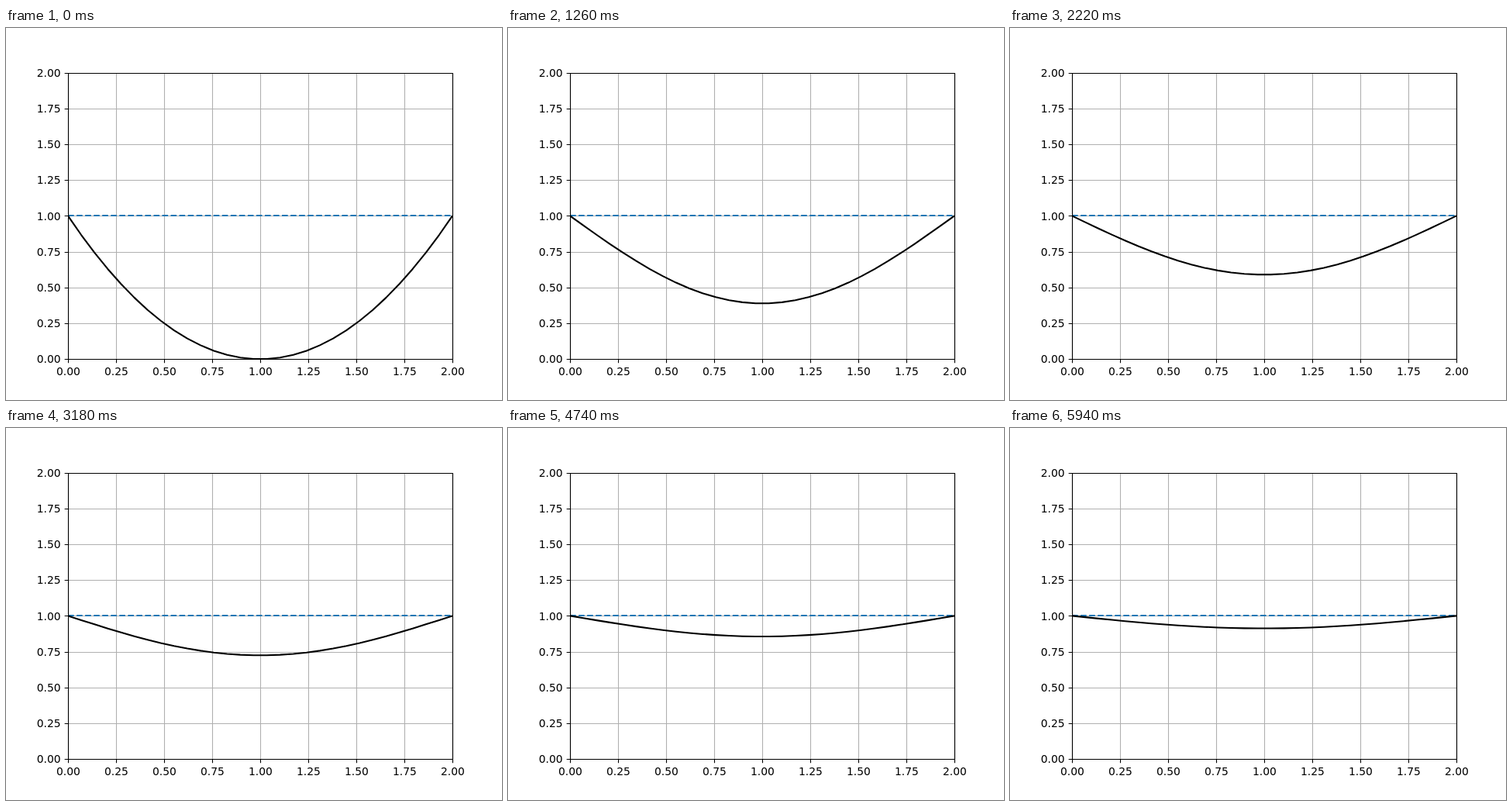
Write an HTML page that moves like this. It is 640 by 480 pixels and loops after 6 s.

```html
<!DOCTYPE html>
<html lang="en">
<head>
<meta charset="utf-8">
<title>Heat equation</title>
<style>
  html, body { margin: 0; width: 100%; height: 100%; overflow: hidden; background: #fff; }
  svg { display: block; width: 640px; height: 480px; }
  text { font: 13.889px "DejaVu Sans", sans-serif; }
</style>
</head>
<body>
<svg id="plot" viewBox="0 0 640 480">
  <clipPath id="area"><rect x="80" y="57.6" width="496" height="369.6"/></clipPath>
</svg>
<script>
const STEP = 60, STEPS = 100, POINTS = 30;
const plot = document.getElementById('plot');
const px = x => 80 + 248 * x;
const py = y => 427.2 - 184.8 * y;
const snap = v => Math.floor(v + 0.5) + 0.5;

function add(tag, attrs, text = '') {
  const el = document.createElementNS('http://www.w3.org/2000/svg', tag);
  for (const key in attrs) el.setAttribute(key, attrs[key]);
  el.textContent = text;
  return plot.appendChild(el);
}

function stroke(d, color, width, extra) {
  return add('path', { d, fill: 'none', stroke: color, 'stroke-width': width, ...extra });
}

const ticks = Array.from({ length: 9 }, (_, i) => i / 4);
const left = snap(px(0)), right = snap(px(2));
const top_ = snap(py(2)), bottom = snap(py(0));

// Grid, ticks and labels
for (const v of ticks) {
  const x = snap(px(v)), y = snap(py(v)), label = v.toFixed(2);
  stroke(`M${x} ${bottom}V${top_}M${left} ${y}H${right}`, '#b0b0b0', 1.11);
  stroke(`M${x} ${bottom}v4.86M${left} ${y}h-4.86`, '#000', 1.11);
  add('text', { x: px(v) + 0.4, y: 448, 'text-anchor': 'middle' }, label);
  add('text', { x: 70.6, y: Math.round(py(v) + 5.28), 'text-anchor': 'end' }, label);
}

stroke('M80 242H576', '#1f77b4', 2.083,
  { 'stroke-dasharray': '7.708 3.333', 'clip-path': 'url(#area)' });
const curve = stroke('', '#000', 2.083,
  { 'stroke-linejoin': 'round', 'clip-path': 'url(#area)' });
stroke(`M${left} ${top_}H${right}V${bottom}H${left}Z`, '#000', 1.11);

// Fourier solution for u(x, 0) = (x - 1)^2 with both ends held at 1
function heat(x, t) {
  let sum = 0;
  for (let n = 1; n < 80; n += 2) {
    const k = n * Math.PI / 2;
    sum += Math.sin(k * x) * Math.exp(-k * k * t) / n ** 3;
  }
  return 1 - 32 / Math.PI ** 3 * sum;
}

let shown = -1;
function draw(now) {
  const step = Math.floor(now / STEP) % STEPS;
  if (step !== shown) {
    shown = step;
    const points = Array.from({ length: POINTS }, (_, i) => {
      const x = 2 * i / (POINTS - 1);
      return `${px(x).toFixed(2)} ${py(heat(x, step / (STEPS - 1))).toFixed(2)}`;
    });
    curve.setAttribute('d', 'M' + points.join('L'));
  }
}

function tick() {
  draw(performance.now());
  requestAnimationFrame(tick);
}
tick();
</script>
</body>
</html>
```
